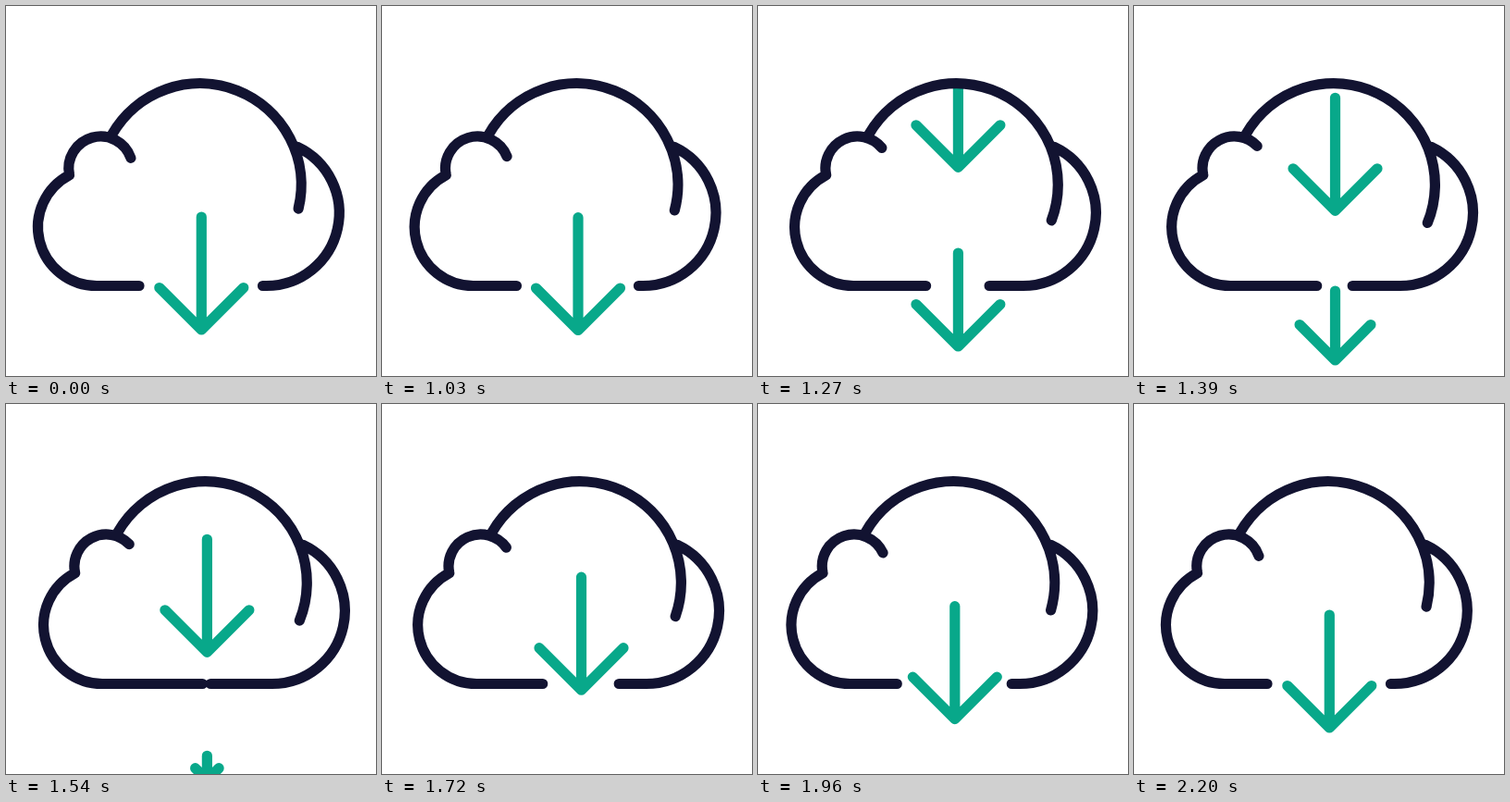
Recreate the animation shown at these times as an HTML page. Size 400 by 400 pixels, loop 2230 ms.

```html
<!DOCTYPE html>
<html lang="en">
<head>
<meta charset="utf-8">
<title>Cloud download</title>
<style>
  html, body { margin: 0; height: 100%; overflow: hidden; background: #fff; }
  svg { display: block; width: 100vw; height: 100vh; }
  path { fill: none; stroke-width: 11.2; stroke-linecap: round; stroke-linejoin: round; }
  .arrow { stroke: #08a88a; }
  .cloud { stroke: #121331; }
</style>
</head>
<body>
<svg viewBox="0 0 400 400">
  <clipPath id="inside"><path d="M0 193.2H100.2A109.5 109.5 0 0 1 319.2 193.2H400V400H0Z"/></clipPath>
  <g id="scene">
    <path id="leaving" class="arrow"/>
    <g clip-path="url(#inside)"><path id="arriving" class="arrow"/></g>
    <path id="cloud" class="cloud"/>
  </g>
</svg>
<script>
const LOOP = 2230, START = 1000, STEP = 30, MOVE = 1200;
const SHAFT = 122, WING = 45.5, ARROW_X = 211.3, REST_Y = 350;
const $ = id => document.getElementById(id);

// Smooth track through [time, value] keys, flat at peaks and ends.
function track(keys) {
  const slope = i => (keys[i + 1][1] - keys[i][1]) / (keys[i + 1][0] - keys[i][0]);
  const tangents = keys.map((_, i) => {
    if (i === 0 || i === keys.length - 1) return 0;
    const a = slope(i - 1), b = slope(i);
    return a * b > 0 ? (a + b) / 2 : 0;
  });
  return t => {
    let i = 0;
    while (i < keys.length - 2 && t > keys[i + 1][0]) i++;
    const [t0, v0] = keys[i], [t1, v1] = keys[i + 1];
    const d = t1 - t0, u = (t - t0) / d, w = 1 - u;
    return v0 * w * w * (1 + 2 * u) + v1 * u * u * (1 + 2 * w)
      + d * u * w * (tangents[i] * w - tangents[i + 1] * u);
  };
}

const sway = track([[0, 0], [30, .7], [270, 5.1], [390, 6.2], [470, 6.5],
  [570, 5.8], [720, 4.2], [960, 1.5], [1200, 0]]);
const closing = track([[0, 0], [30, .75], [270, 32.5], [390, 47.5], [510, 64],
  [720, 25.5], [960, 4.75], [1200, 0]]);

function polar(cx, cy, r, degrees) {
  const a = degrees * Math.PI / 180;
  return `${cx + r * Math.cos(a)} ${cy + r * Math.sin(a)}`;
}

function arc(cx, cy, r, from, to) {
  return `${polar(cx, cy, r, from)}A${r} ${r} 0 0 1 ${polar(cx, cy, r, to)}`;
}

function arrow(tip, shaft, wing) {
  return `M${ARROW_X} ${tip - shaft}V${tip}`
    + `M${ARROW_X - wing} ${tip - wing}L${ARROW_X} ${tip}L${ARROW_X + wing} ${tip - wing}`;
}

function cloud(shift, gap) {
  return `M${144 + gap} 302.5L` + arc(98, 239, 63.5, 90, 242.4)
    + 'L' + arc(102.3, 175.5, 34.5, 168, -19 - 4.1 * shift)
    + 'M' + arc(209.7, 193.2, 109.5, 209.7, 13.7 + 1.36 * shift)
    + `M${277.5 - gap} 302.5H281.7A78.8 78.8 0 0 0 315 152.4`;
}

function leavingArrow(t) {
  if (t >= 590) return '';
  const trim = Math.max(0, (t - 260) / 330);
  return arrow(REST_Y + 33 * (t / 390) ** 1.65,
    SHAFT - 47 * (t / 390) ** 2.19,
    WING * (1 - trim * trim));
}

function arrivingArrow(t) {
  const left = 1 - t / MOVE;
  return arrow(REST_Y - 215 * left ** 2 - 100 * left ** 3, SHAFT, WING);
}

function draw(now) {
  const elapsed = Math.max(0, now % LOOP - START);
  const t = Math.floor(elapsed / STEP) * STEP;
  const shift = sway(t);
  $('scene').setAttribute('transform', `translate(${shift} 0)`);
  $('cloud').setAttribute('d', cloud(shift, closing(t)));
  $('leaving').setAttribute('d', leavingArrow(t));
  $('arriving').setAttribute('d', arrivingArrow(t));
}

const begin = performance.now();
function tick() {
  draw(performance.now() - begin);
  requestAnimationFrame(tick);
}
tick();
</script>
</body>
</html>
```
